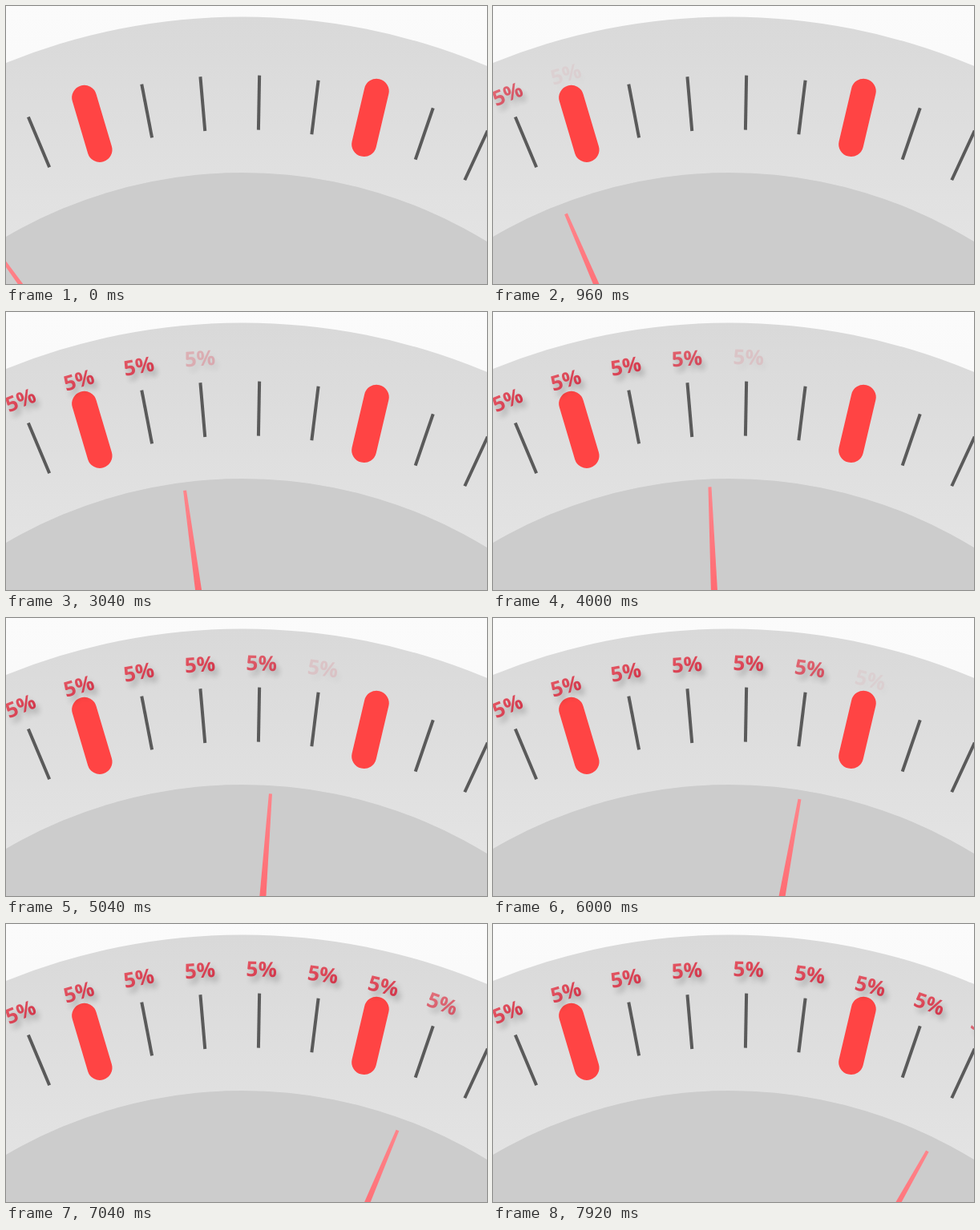
Animation of 600x347 px, one loop 8400 ms. Source, as an HTML page:

```html
<!DOCTYPE html>
<html lang="en">
<head>
<meta charset="utf-8">
<title>Dial</title>
<style>
html, body { margin: 0; width: 100%; height: 100%; overflow: hidden; background: #fafafa; }
svg { display: block; width: 600px; height: 347px; }
text { font: 700 26px "Open Sans", sans-serif; text-anchor: middle; fill: url(#ink); }
.label { filter: drop-shadow(4px 6px 3px rgba(0, 0, 0, .22)); }
.tick { stroke: #5a5a5a; stroke-width: 4; }
.mark { stroke: #ff4444; stroke-width: 31; stroke-linecap: round; }
</style>
</head>
<body>
<svg viewBox="0 0 600 347">
  <defs>
    <linearGradient id="page" x2="0" y2="1">
      <stop stop-color="#fbfbfb"/><stop offset="1" stop-color="#f5f5f5"/>
    </linearGradient>
    <linearGradient id="ring" gradientUnits="userSpaceOnUse" x1="0" y1="14" x2="0" y2="290">
      <stop stop-color="#d9d9d9"/><stop offset="1" stop-color="#e3e3e3"/>
    </linearGradient>
    <linearGradient id="ink" x2=".5" y2="1">
      <stop stop-color="#e8606a"/><stop offset="1" stop-color="#d2354a"/>
    </linearGradient>
    <linearGradient id="hand" gradientUnits="userSpaceOnUse" x1="0" y1="-509" x2="0" y2="-380">
      <stop stop-color="#ff858b"/><stop offset="1" stop-color="#ff6b72"/>
    </linearGradient>
  </defs>
  <rect width="600" height="347" fill="url(#page)"/>
  <circle cx="295.2" cy="799.5" r="786" fill="url(#ring)"/>
  <circle cx="294.9" cy="792" r="584" fill="#ccc"/>
  <g id="scale"></g>
  <path id="needle" d="M-2-509H2L4.2-370H-4.2Z" fill="url(#hand)"/>
</svg>
<script>
const LOOP = 8400, STEP = 80;
const CENTER = { x: 295, y: 796 }, PIVOT = '292 727';
const COUNT = 9, FIRST = -22.08, GAP = 5.955;
const REST = -24.2, TURN = 6.7;
const LONG = [.14, .5, .86, 1], SHORT = [.45, .88, 1], MID = [.25, .62, .92, 1];
// Each move: start time and progress per step.
const moves = [
  [0, [0, .5, .86, 1]], [960, LONG], [1920, LONG],
  [3040, SHORT], [4000, MID], [5040, MID],
  [6000, LONG], [6800, LONG], [7760, SHORT]
];

const scale = document.getElementById('scale');
const needle = document.getElementById('needle');

function add(parent, name, attrs) {
  const el = document.createElementNS('http://www.w3.org/2000/svg', name);
  for (const key in attrs) el.setAttribute(key, attrs[key]);
  return parent.appendChild(el);
}

function place(angle, radius, tilt) {
  const a = angle * Math.PI / 180;
  const x = CENTER.x + radius * Math.sin(a);
  const y = CENTER.y - radius * Math.cos(a);
  return `translate(${x} ${y}) rotate(${tilt})`;
}

const labels = Array.from({ length: COUNT }, (_, i) => {
  const angle = FIRST + i * GAP;
  const big = i % 5 === 1;
  add(scale, 'line', {
    class: big ? 'mark' : 'tick',
    y1: -34, y2: 34,
    transform: place(angle, 675.7, angle + (big ? .2 : -.1) - .6)
  });
  const group = add(scale, 'g', { class: 'label' });
  const text = add(group, 'text', { y: 9.3, transform: place(angle + .1, 740, angle) });
  text.textContent = '5%';
  return group;
});

function draw(time) {
  const t = Math.floor((time % LOOP) / STEP) * STEP;
  let now = 0;
  while (now + 1 < COUNT && moves[now + 1][0] <= t) now++;
  const [start, steps] = moves[now];
  const p = steps[Math.min((t - start) / STEP, steps.length - 1)];

  const from = now ? REST + (now - 1) * TURN : -35.8;
  const to = REST + now * TURN;
  needle.setAttribute('transform', `translate(${PIVOT}) rotate(${from + (to - from) * p})`);

  // A label nearly fills in during its own move and completes in the next.
  labels.forEach((label, i) => {
    label.style.opacity =
      i > now ? 0 :
      i === now ? .8 * p ** 1.2 :
      i === now - 1 ? .8 + .2 * Math.min(1, 2 * p) : 1;
  });
}

function tick(time) {
  draw(time);
  requestAnimationFrame(tick);
}
draw(0);
requestAnimationFrame(tick);
</script>
</body>
</html>
```
